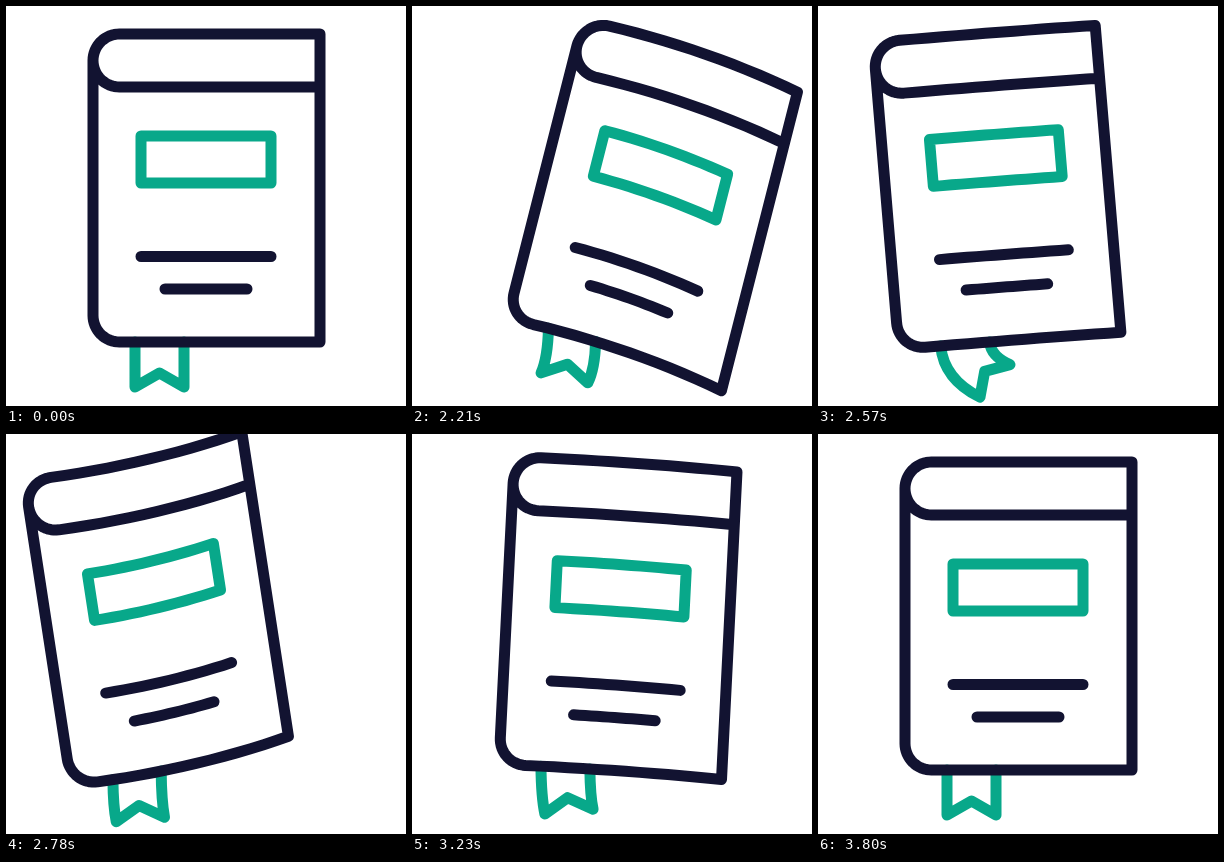
Animation, 400 px wide and 400 px high, one loop 3830 ms. Source, as an HTML page:

```html
<!DOCTYPE html>
<html lang="en">
<head>
<meta charset="utf-8">
<title>Book</title>
<style>
  html, body { margin: 0; width: 100%; height: 100%; overflow: hidden; background: #fff; }
  svg { display: block; width: 100vw; height: 100vh; }
  path { fill: none; stroke-width: 11; stroke-linecap: round; stroke-linejoin: round; }
  .navy { stroke: #121331; }
  .green { stroke: #08a88a; }
</style>
</head>
<body>
<svg viewBox="0 0 400 400">
  <path id="bookmark" class="green"/>
  <path id="label" class="green"/>
  <path id="lines" class="navy"/>
  <path id="cover" class="navy"/>
</svg>
<script>
const LOOP = 3830, START = 2030, STEP = 30;
const PUSH = 1990, SETTLED = 3750;
const PIVOT = { x: 200, y: 336 };

const ease = p => (1 - Math.cos(Math.PI * p)) / 2;
const clamp = p => Math.min(1, Math.max(0, p));
const radians = degrees => degrees * Math.PI / 180;

// Sways through evenly spaced peaks, from rest back to rest.
function sway(t, first, gap, ...peaks) {
  let value = 0, from = PUSH;
  [...peaks, 0].forEach((peak, i) => {
    const to = Math.min(first + i * gap, SETTLED);
    if (t > from) value += (peak - (peaks[i - 1] ?? 0)) * ease(clamp((t - from) / (to - from)));
    from = to;
  });
  return value;
}

// The book tips first; its softer reactions follow later and slower.
const poseAt = t => ({
  angle: sway(t, 2240, 465, 14.8, -9.5, 3),
  lift:  sway(t, 2280, 495, 5.8, -7, 0.5),
  bend:  sway(t, 2300, 520, 10.5, -8, 3.2),
  shift: sway(t, 2320, 535, 8, -24, 6),
  swing: sway(t, 2210, 385, -12, 48, -43, 24),
  pull:  5 * Math.sin(Math.PI * clamp((t - PUSH) / (SETTLED - PUSH)))
});

function line(x0, x1, y, n = 14) {
  return Array.from({ length: n + 1 }, (_, i) => [x0 + (x1 - x0) * i / n, y]);
}

function arc(cx, cy, r, from, to, n = 16) {
  return Array.from({ length: n + 1 }, (_, i) => {
    const a = radians(from + (to - from) * i / n);
    return [cx + r * Math.cos(a), cy + r * Math.sin(a)];
  });
}

const R = 26.5, INNER = 113.5, RIGHT = 314, TOP = 28, BOTTOM = 336;
const outline = [
  ...line(RIGHT, INNER, TOP), ...arc(INNER, TOP + R, R, 270, 180),
  ...arc(INNER, BOTTOM - R, R, 180, 90), ...line(INNER, RIGHT, BOTTOM)
];
const pages = [...arc(INNER, TOP + R, R, 180, 90), ...line(INNER, RIGHT, TOP + 2 * R)];
const label = [...line(135, 265, 130), ...line(265, 135, 177)];
const longLine = line(135, 265, 250.5);
const shortLine = line(159, 241, 283);

// Bends a resting point, then turns it about the foot of the book.
function warp([px, py], pose, softness = 1) {
  const u = (px - PIVOT.x) / 114;
  const x = px - PIVOT.x + pose.shift - pose.pull * Math.max(0, u) ** 3;
  const y = py - PIVOT.y + softness * (pose.lift + pose.bend * (u + 0.8 * u * u));
  const a = radians(pose.angle), c = Math.cos(a), s = Math.sin(a);
  return [PIVOT.x + x * c - y * s, PIVOT.y + x * s + y * c];
}

const xy = p => p.map(v => v.toFixed(2)).join(' ');
const trace = (points, pose, softness) =>
  'M' + points.map(p => xy(warp(p, pose, softness))).join('L');

function bookmarkPath(pose) {
  const left = warp([129, BOTTOM], pose), right = warp([178, BOTTOM], pose);
  const { swing } = pose, size = Math.abs(swing);
  const c = Math.cos(radians(swing)), s = -Math.sin(radians(swing));
  const half = 24.5 - size * 0.05, notch = 14;
  const mx = (left[0] + right[0]) / 2 + swing * 0.63;
  const my = (left[1] + right[1]) / 2 + 45 - size * 0.17;
  const tipL = [mx - half * c, my - half * s];
  const tipR = [mx + half * c, my + half * s];
  const dip = [mx + notch * s, my - notch * c];
  const knee = (top, tip) => [top[0] + (tip[0] - top[0]) * 0.08, top[1] + (tip[1] - top[1]) * 0.65];
  return `M${xy(left)}Q${xy(knee(left, tipL))} ${xy(tipL)}L${xy(dip)}L${xy(tipR)}` +
         `Q${xy(knee(right, tipR))} ${xy(right)}`;
}

const setPath = (id, d) => document.getElementById(id).setAttribute('d', d);

function render(ms) {
  const t = ms % LOOP;
  const pose = poseAt(t < START ? 0 : START + Math.floor((t - START) / STEP) * STEP);
  const printed = 1.25;
  setPath('bookmark', bookmarkPath(pose));
  setPath('label', trace(label, pose, printed) + 'Z');
  setPath('lines', trace(longLine, pose, printed) + trace(shortLine, pose, printed));
  setPath('cover', trace(outline, pose) + 'Z' + trace(pages, pose));
}

let begin;
function frame(now) {
  begin ??= now;
  render(now - begin);
  requestAnimationFrame(frame);
}
render(0);
requestAnimationFrame(frame);
</script>
</body>
</html>
```
